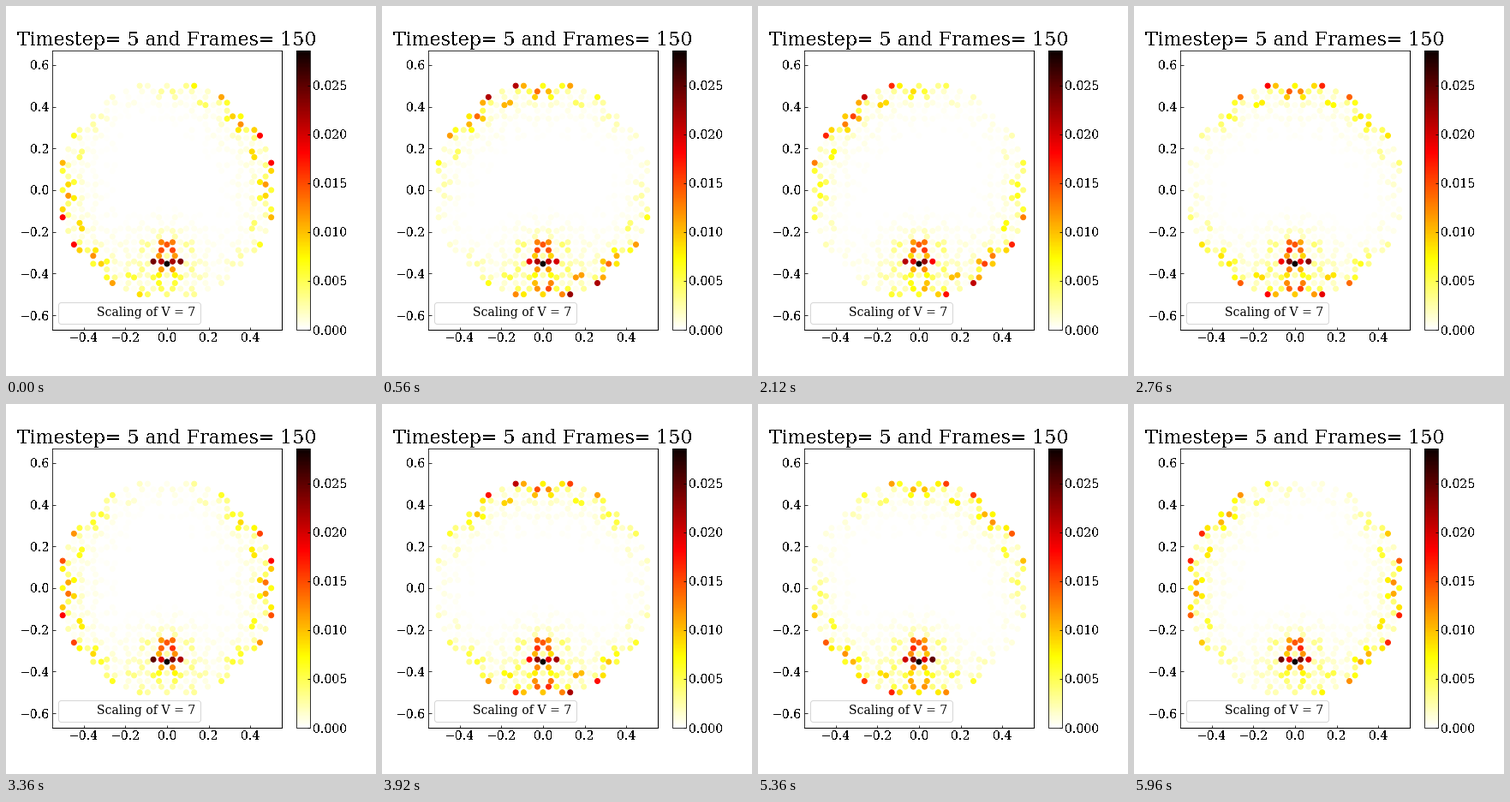
Write a matplotlib script that moves like this. It is 432 by 432 pixels and loops after 6000 ms.

```python
import numpy as np
import matplotlib.pyplot as plt
from matplotlib.animation import FuncAnimation
from matplotlib.lines import Line2D
from matplotlib.ticker import MultipleLocator

FRAMES, INTERVAL = 150, 40
VMAX = 0.0286
EDGE = 6 + 5 * np.sqrt(2)          # inradius of the patch, in tile edges
IMPURITY = 0, -5 - 3 * np.sqrt(2)
START, SPEED = 25.0, 19.06         # lobe axis in degrees, its turn per frame
# Radius of the rings that carry the edge mode, with their peak density
RINGS = {13.510: 0.0185, 13.292: 0.0095, 13.071: 0.0080,
         12.384: 0.0130, 12.481: 0.0045, 11.700: 0.0088}

plt.rcParams.update({
    "font.family": "DejaVu Serif", "font.size": 14,
    "xtick.direction": "in", "ytick.direction": "in",
    "text.antialiased": False,
})


def oct_norm(p):
    x, y = np.abs(p)
    return np.maximum(np.maximum(x, y), (x + y) / np.sqrt(2))


def project(n, step):
    a = step * np.arange(4) * np.pi / 4
    return np.array([np.cos(a), np.sin(a)]) @ n


def tiling():
    """Ammann-Beenker vertices by cut and project, cut to an octagon."""
    n = np.indices((19,) * 4).reshape(4, -1) - 9
    n = n[:, oct_norm(project(n, 3)) < 0.5 + np.sqrt(0.5)]
    n = n[:, oct_norm(project(n, 1)) < EDGE + 0.01]
    return project(n, 1), np.hypot(*project(n, 3))


def cos2(deg):
    return np.cos(2 * np.radians(deg))


pos, perp = tiling()
radius = np.hypot(*pos)
theta = np.degrees(np.arctan2(pos[1], pos[0]))

# Edge mode: bright rings over a background that fades inwards
gain = 1 + 0.1 * cos2(theta - 120) + 0.09 * np.sign(np.sin(4 * np.radians(theta)))
peak = 0.004 * np.exp((oct_norm(pos) - EDGE) / 2) * perp ** 2
floor = np.full(radius.size, 0.2)
for r, amp in RINGS.items():
    ring = np.abs(radius - r) < 0.01
    peak[ring] = amp * gain[ring]
    floor[ring] = 0.06

# Bound state: four lobes decaying from the impurity, inside a soft halo
dx, dy = pos[0] - IMPURITY[0], pos[1] - IMPURITY[1]
dist = np.hypot(dx, dy)
lobes = 0.5 + 0.5 * (np.abs(dx ** 2 - dy ** 2) + 1e-9) / (dist ** 2 + 1e-9)
core = (dy > -0.8) & (dist < np.where(np.abs(dx) < 0.8, 2.82, 1.75))
bound = np.where(
    core,
    VMAX * np.exp(-np.hypot(dx / 2, dy) / 3.6) * lobes * np.clip(perp / 0.7, 0, 1) ** 2,
    0.0055 * np.exp(-dist ** 2 / 13) * perp ** 2)
peak[core] = 0
swing = 0.16 * np.minimum(np.abs(dx), 1)
axis = 117 + 67 * dx


def density(k):
    phi = START + SPEED * k
    lobe = 0.5 + 0.5 * cos2(theta - phi)
    return (bound * (1 + swing * cos2(phi - axis))
            + peak * (floor + (1 - floor) * lobe))


fig = plt.figure(figsize=(6, 6), dpi=72, facecolor="white")
ax = fig.add_axes([0.125, 0.125, 0.62, 0.755])
half = 0.55 * 0.755 / 0.62
ax.set(xlim=(-0.55, 0.55), ylim=(-half, half))
ax.xaxis.set_major_locator(MultipleLocator(0.2))
ax.yaxis.set_major_locator(MultipleLocator(0.2))
ax.spines[["right", "bottom"]].set_linewidth(1)
ax.set_title("Timestep= 5 and Frames= 150", fontsize=22)

dots = ax.scatter(*(pos * 0.5 / EDGE), c=density(0), cmap="hot_r",
                  vmin=0, vmax=VMAX)
legend = ax.legend([Line2D([], [], ls="none")], ["Scaling of V = 7"],
                   loc="lower left", fontsize=14)
legend.get_texts()[0].set_antialiased(True)

cax = fig.add_axes([0.78375, 0.125, 0.03775, 0.755])
fig.colorbar(dots, cax=cax, ticks=MultipleLocator(0.005))


def update(k):
    dots.set_array(density(k))
    return (dots,)


anim = FuncAnimation(fig, update, frames=FRAMES, interval=INTERVAL,
                     repeat=True, repeat_delay=0)
plt.show()
```
